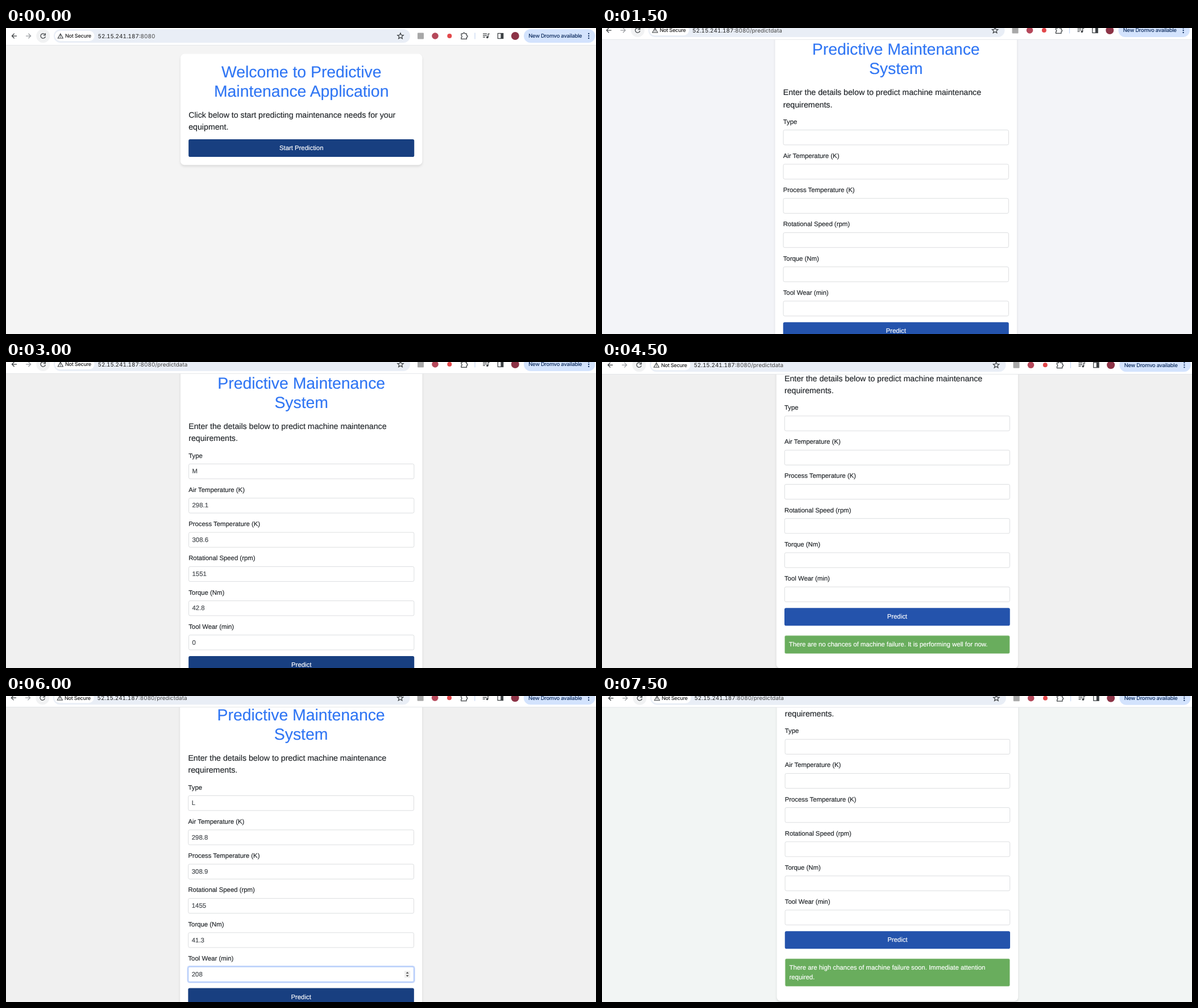
Write an HTML page that moves like this. It is 1038 by 539 pixels and loops after 9 s.

```html
<!DOCTYPE html>
<html lang="en">
<head>
<meta charset="utf-8">
<title>Predictive Maintenance</title>
<style>
  html, body { margin: 0; width: 100%; height: 100%; overflow: hidden; }
  body { position: relative; text-rendering: geometricPrecision; }
  * { box-sizing: border-box; }
  #card {
    position: absolute; left: 0; top: 0; width: 600px; padding: 20px;
    transform-origin: 0 0; border-radius: 10px; background: #fff;
    box-shadow: 0 4px 6px rgba(0, 0, 0, .1);
    font: 16px/24px "Liberation Sans", Arial, sans-serif; color: #212529;
    -webkit-text-stroke: .25px;
  }
  #card.form { padding-bottom: 36px; }
  h1, p, label { position: relative; top: 1px; }
  h1 { margin: 0 0 20px; font-size: 40px; line-height: 48px; font-weight: 400; text-align: center; color: #3076f4; }
  p { margin: 0 0 16px; font-size: 20px; line-height: 30px; }
  label { display: block; margin-bottom: 8px; }
  .field {
    position: relative; height: 38px; margin-bottom: 15px; padding: 7px 8px 5px;
    border: 1px solid #ced0d4; border-radius: 4px; color: #40454a;
  }
  .focus { border-color: #80aaf8; box-shadow: 0 0 0 2.5px #c3d5fb; }
  .field svg { position: absolute; right: 8px; top: 9px; }
  .button, .alert { padding: 11px 10px 9px; border-radius: 4px; color: #fff; }
  .button { height: 44px; text-align: center; background: #2453ac; }
  .hover { background: #183f80; }
  .alert { margin-top: 24px; border: 1px solid #dcebd8; background: #69ad5d; }
  #bar { position: absolute; left: 0; top: 0; overflow: visible; font-family: Inter, Roboto, sans-serif; }
  .ink { fill: none; stroke: #3c4043; stroke-width: 1.25; }
  .small { font-weight: 500; letter-spacing: -.03em; }
  .url { font-size: 9.95px; font-variant-numeric: tabular-nums; }
</style>
</head>
<body>
<div id="card"></div>
<svg id="bar" width="1038" height="31">
  <rect x="-20" y="-20" width="1090" height="50" fill="#fff"/>
  <path d="M-20 30.3H1070" stroke="#e4e6e9"/>
  <path class="ink" d="M19 14H10.6M14.6 9.8L10.4 14l4.2 4.2"/>
  <path class="ink" style="stroke:#9a9da1" d="M35 14H43.4M39.4 9.8L43.6 14l-4.2 4.2"/>
  <circle cx="65.3" cy="14" r="12" fill="#f1f2f3"/>
  <path class="ink" d="M68.4 11.2A4.2 4.2 0 1 0 69.3 15M69.3 9.2v3.5h-3.5"/>
  <rect x="84" y="2" width="627" height="24" rx="12" fill="#e9eef6"/>
  <rect x="86" y="5" width="69.5" height="18" rx="9" fill="#fff"/>
  <path class="ink" style="stroke-width:1.1" d="M95.8 10L100.3 18H91.3zM95.8 12.6v2.6M95.8 16v1"/>
  <text class="small" x="104" y="17.3" font-size="9.1" fill="#1f1f1f">Not Secure</text>
  <text class="url" x="161.5" y="17.7" fill="#1f1f1f">52.15.241.187<tspan id="path" fill="#474747"></tspan></text>
  <path class="ink" d="M694 8.9L695.5 12.4 699.2 12.7 696.4 15.1 697.3 18.8 694 16.8 690.7 18.8 691.6 15.1 688.8 12.7 692.5 12.4z"/>
  <rect x="724" y="8.5" width="11" height="11" rx="1" fill="#a8a8a8"/>
  <circle cx="755" cy="14" r="5.8" fill="#b5485a"/>
  <circle cx="780.3" cy="14" r="4" fill="#e2484b"/>
  <path class="ink" d="M801 10h3a1.7 1.7 0 0 1 3.4 0h3v3a1.7 1.7 0 0 1 0 3.4v3h-9.4v-2.7a1.9 1.9 0 0 0 0-3.6z"/>
  <path d="M825 8.5v11" stroke="#c9d9f3" stroke-width="1.3"/>
  <path class="ink" d="M839 10.4h7M839 13.3h7M839 16.2h4M848.2 16.4V10.4h2.6"/>
  <circle cx="846.8" cy="16.4" r="1.8" fill="#3c4043"/>
  <rect class="ink" x="865.3" y="9.5" width="9.4" height="9"/>
  <path d="M870.4 9.5h4.3v9h-4.3z" fill="#3c4043"/>
  <circle cx="895.8" cy="14" r="7" fill="#8c3346"/>
  <rect x="911" y="2" width="125.5" height="24" rx="12" fill="#d3e3fd"/>
  <text class="small" x="919.3" y="17.4" font-size="9.4" fill="#0b2a5c">New Dromvo available</text>
  <path d="M1025.2 10v0M1025.2 14v0M1025.2 18v0" stroke="#0b2a5c" stroke-width="2.3" stroke-linecap="round"/>
</svg>
<script>
const HOLD = 1500, UNIT = 0.709;
const labels = ["Type", "Air Temperature (K)", "Process Temperature (K)",
  "Rotational Speed (rpm)", "Torque (Nm)", "Tool Wear (min)"];

// x, zoom: window shift and size; bar, top: vertical place of toolbar and card
const scenes = [
  { x: 0, zoom: 1, bar: 0, top: 45.6, bg: "#f4f4f4", hover: true, home: true },
  { x: -2.5, zoom: 1, bar: -10, top: 6.3, bg: "#f3f4f8" },
  { x: 0, zoom: 1, bar: -10, top: 6.2, bg: "#f0f0f0", hover: true,
    values: ["M", "298.1", "308.6", "1551", "42.8", "0"] },
  { x: 0, zoom: 0.9993, bar: -8.7, top: -78.2, bg: "#f0f0f0",
    alert: "There are no chances of machine failure. It is performing well for now." },
  { x: -1.1, zoom: 1.001, bar: -10.8, top: 2, bg: "#f0f0f0", hover: true, focus: 5,
    values: ["L", "298.8", "308.9", "1455", "41.3", "208"] },
  { x: 1.2, zoom: 0.998, bar: -10.2, top: -96.7, bg: "#f2f5f4",
    alert: "There are high chances of machine failure soon. Immediate attention required." }
];

const $ = id => document.getElementById(id);
const spinner = `<svg width="15" height="18"><path d="M0 0h15v18H0z" fill="#efefef"/>
  <path d="M4 7l3.5-4L11 7zM4 11l3.5 4L11 11z" fill="#444" stroke="none"/></svg>`;
const intro = (title, text) => `<h1>${title}</h1><p>${text}</p>`;
const button = (text, hover) => `<div class="button ${hover ? "hover" : ""}">${text}</div>`;

function field(label, i, { values = [], focus }) {
  const on = i === focus;
  return `<label>${label}</label>
    <div class="field ${on ? "focus" : ""}">${values[i] || ""}${on ? spinner : ""}</div>`;
}

function content(s) {
  if (s.home) {
    return intro("Welcome to Predictive<br>Maintenance Application",
      "Click below to start predicting maintenance needs for your equipment.") +
      button("Start Prediction", s.hover);
  }
  return intro("Predictive Maintenance<br>System",
    "Enter the details below to predict machine maintenance<br>requirements.") +
    labels.map((label, i) => field(label, i, s)).join("") +
    button("Predict", s.hover) +
    (s.alert ? `<div class="alert">${s.alert}</div>` : "");
}

function show(s) {
  document.body.style.background = s.bg;
  $("card").className = s.home ? "" : "form";
  $("card").innerHTML = content(s);
  $("card").style.transform =
    `translate(${s.x + 307 * s.zoom}px, ${s.top}px) scale(${UNIT * s.zoom})`;
  $("bar").style.transformOrigin = "0 0";
  $("bar").style.transform = `translate(${s.x}px, ${s.bar}px) scale(${s.zoom})`;
  $("path").textContent = s.home ? ":8080" : ":8080/predictdata";
}

let shown = -1;
const start = performance.now();
function tick() {
  const i = Math.floor((performance.now() - start) / HOLD) % scenes.length;
  if (i !== shown) show(scenes[shown = i]);
  requestAnimationFrame(tick);
}
tick();
</script>
</body>
</html>
```
